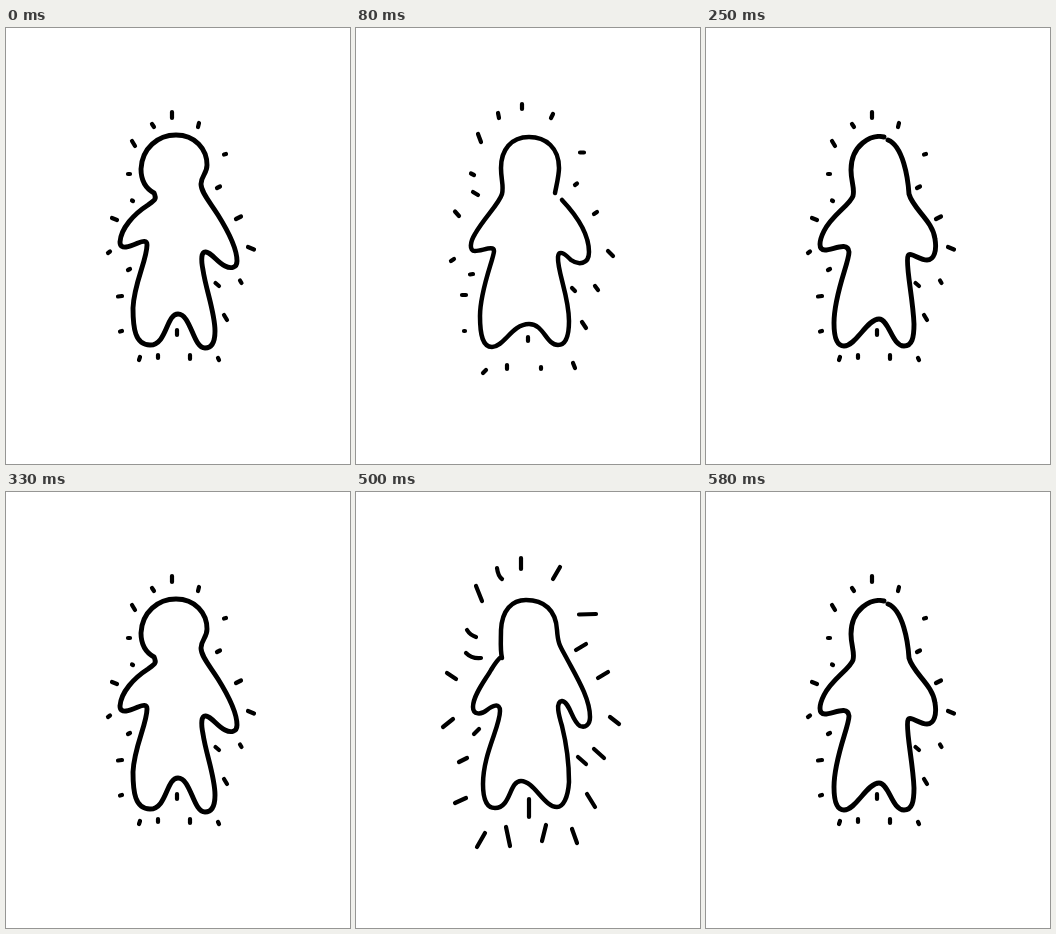
Write an HTML page that moves like this. It is 344x436 px and loops after 660 ms.

```html
<!DOCTYPE html>
<html lang="en">
<head>
<meta charset="utf-8">
<title>Glowing figure</title>
<style>
  html, body { margin: 0; width: 100%; height: 100%; overflow: hidden; background: #fff; }
  svg { display: block; width: 100%; height: 100%; }
  path { fill: none; stroke: #000; stroke-linecap: round; stroke-linejoin: round; }
  .body { stroke-width: 4.5; }
  .bold { stroke-width: 4.9; }
  .rays { stroke-width: 4.2; }

  /* Four drawings, held for 80, 90, 80 and 80 ms */
  .pose { opacity: 0; animation: 330ms step-end infinite; }
  .first { animation-name: first; }
  .second { animation-name: second; }
  .third { animation-name: third; }
  .fourth { animation-name: fourth; }
  .resting { animation-name: resting; }
  @keyframes first { 0% { opacity: 1 } 24.242%, 100% { opacity: 0 } }
  @keyframes second { 0% { opacity: 0 } 24.242% { opacity: 1 } 51.515%, 100% { opacity: 0 } }
  @keyframes third { 0% { opacity: 0 } 51.515% { opacity: 1 } 75.757%, 100% { opacity: 0 } }
  @keyframes fourth { 0% { opacity: 0 } 75.757%, 100% { opacity: 1 } }
  @keyframes resting { 0% { opacity: 1 } 24.242% { opacity: 0 } 75.757%, 100% { opacity: 1 } }
</style>
</head>
<body>
<svg viewBox="0 0 344 436">
  <path class="pose first bold" d="M148 165C139 160 135 151 135 141C136 120 152 107 170 107
    C189 107 201 121 201 137C201 146 195 148 195 156C195 164 203 173 212 187
    C222 203 231 222 231 233C231 240 225 241 219 238C211 234 206 225 200 224
    C195 223 195 232 197 242C200 262 209 285 209 303C209 315 205 320 199 320
    C187 320 185 286 172 286C160 286 161 317 144 317C129 317 127 300 127 280
    C128 255 141 232 141 217C141 212 137 213 132 215C125 218 114 223 114 214
    C115 200 128 186 142 177C149 172 151 171 148 165"/>

  <path class="pose fourth bold" d="M178 109C165 106 145 117 145 142C145 154 149 160 147 168
    C144 177 126 187 118 203C113 213 112 222 119 222C127 222 142 213 143 224
    C143 235 128 266 128 295C128 310 131 318 138 318C150 318 161 291 173 291
    C183 291 186 318 198 318C206 318 208 310 208 296C207 270 199 235 202 228
    C204 223 213 232 221 232C228 232 231 223 229 211C227 193 207 181 203 166
    C202 150 197 118 182 112"/>

  <path class="pose resting rays" d="M166 84V90M146 96L148 99M193 95L192 99M126 113L129 118
    M218 126.5L220 126M122 146H124M211 160L214 158.5M126 172.5L127 173M106 190L111 192
    M230 191L235 188.5M102 225L104 223.5M242 219L248 221.5M122 242L124 241M209.5 255L213 258
    M234 252.5L235.5 255M112 268.5L116 268M218 287L221 292M114 303.5L116 303M171 302V307
    M134 329L133 332M152 327V330M184 327V331M212 330L213 332"/>

  <g class="pose second">
    <path class="body" d="M199 165C201 155 203 147 203 140C203 120 190 109 173 109
      C155 109 145 122 145 140C145 152 148 158 146 166C143 176 128 190 119 206
      C114 214 113 223 119 223C126 223 138 217 138 223C138 230 124 262 124 288
      C124 308 127 319 136 319C148 319 156 296 173 296C188 296 190 317 202 317
      C210 317 213 307 213 293C213 268 201 243 202 229C203 220 211 228 215 232
      C222 237 233 237 233 224C233 208 222 189 206 172"/>
    <path class="rays" d="M166 76V81M142 85L143 90M197 86L195 90M122 106L125 114
      M224 124.5H228M115 145.5L118 147M117 164L122 167M219 157L221 155.5M99 183.5L103 188
      M238 186L241 184M95 233L98 231M252 223L257 228M114 246.5L117 246M106 267H110
      M216 260L219 263M239 258L242 262M226 294L230 300M108 303H109M172 309V313
      M130 342L127 345M151 337V341M185 339V341M217 335L219 340"/>
  </g>

  <g class="pose third">
    <path class="body" d="M146 166C144 158 145 148 145 138C146 118 156 108 170 108
      C188 108 200 118 201 138C202 152 204 154 210 165C220 184 234 206 234 225
      C234 233 229 236 224 234C216 230 214 210 206 209C199 210 203 224 206 234
      C210 250 213 270 213 290C212 306 207 315 201 315C188 315 178 289 165 289
      C153 289 155 316 139 316C130 316 127 306 127 292C127 262 144 235 144 219
      C144 210 136 214 131 218C125 223 117 223 117 215C117 203 130 187 135 178
      C138 173 141 168 145 165"/>
    <path class="rays" d="M165 66V77M141 76Q142 84 146 87M204 75L197 87M120 94L126 109
      M223 122.5L240 122M111 138Q114 143 120 145M110 161Q116 167 125 166M220 158L230 152
      M91 181L100 187M242 186L252 180M97 227L87 235M254 225L263 232M123 237L118 242
      M103 270L111 266M222 265L230 272M238 257L248 266M231 302L239 315M99 311L110 306
      M173 307V325M129 341L121 355M150 335L154 354M190 333L186 349M216 337L221 351"/>
  </g>
</svg>
</body>
</html>
```
